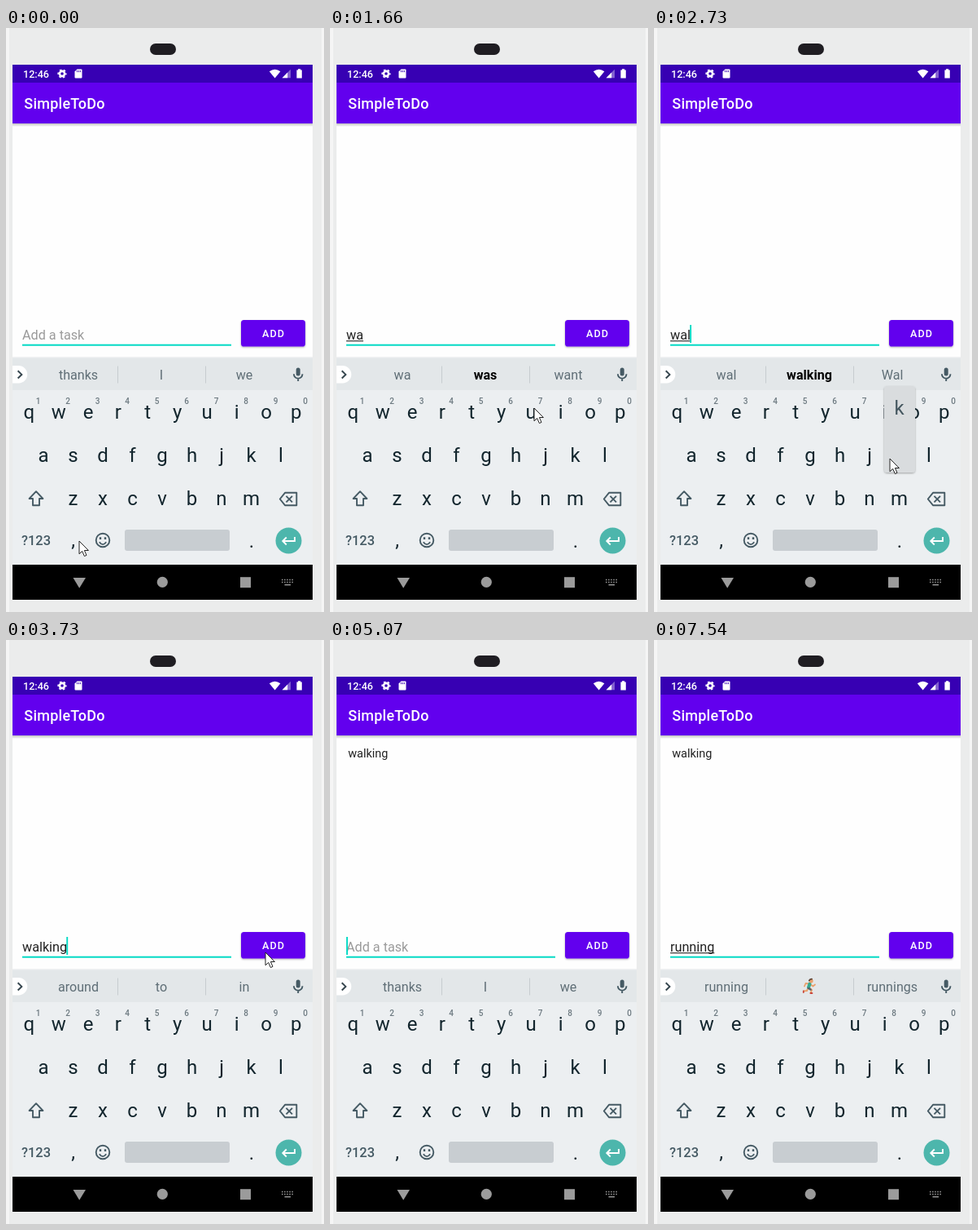
Write an HTML page that moves like this. It is 391 px wide and 716 px high and loops after 8000 ms.

```html
<!DOCTYPE html>
<html lang="en">
<head>
<meta charset="utf-8">
<title>To-do app demo</title>
<style>
html, body { margin: 0; width: 100%; height: 100%; overflow: hidden; background: #f5f5f5; }
svg { display: block; width: 391px; height: 716px; }
text { font-family: Roboto, sans-serif; white-space: pre; }
.mid { text-anchor: middle; }
.key { font-size: 24px; fill: #12252d; text-anchor: middle; }
.num { font-size: 10px; font-weight: 500; fill: #6c7980; text-anchor: middle; }
.sug { font-size: 16.1px; fill: #5f6e76; text-anchor: middle; }
.sug.bold { font-weight: 700; fill: #000; }
.line { fill: none; stroke: #455a64; stroke-width: 1.9; }
</style>
</head>
<body>
<svg viewBox="0 0 391 716">
  <defs>
    <linearGradient id="fade" x2="0" y2="1">
      <stop offset="0" stop-color="#000" stop-opacity=".24"/>
      <stop offset="1" stop-color="#000" stop-opacity="0"/>
    </linearGradient>
    <filter id="soft" x="-20%" y="-20%" width="140%" height="150%">
      <feDropShadow dx="0" dy="1" stdDeviation="1.1" flood-opacity=".32"/>
    </filter>
  </defs>

  <!-- phone body -->
  <rect width="391" height="716" fill="#f5f5f5"/>
  <rect x="4" width="384" height="716" fill="#ebecec"/>
  <rect x="177" y="19" width="32" height="14" rx="7" fill="#1f1d22"/>
  <rect x="8" y="45" width="369" height="656" fill="#fefefe"/>

  <!-- bars -->
  <rect x="8" y="45" width="369" height="22" fill="#3700b3"/>
  <rect x="8" y="67" width="369" height="50" fill="#6200ee"/>
  <rect x="8" y="117" width="369" height="4" fill="url(#fade)"/>
  <text x="21" y="60.7" font-size="12.6" font-weight="500" fill="#fff">12:46</text>
  <text x="22.3" y="98.6" font-size="18" font-weight="500" letter-spacing=".25" fill="#fff">SimpleToDo</text>

  <!-- status icons -->
  <g fill="#fff">
    <circle cx="69" cy="56" r="3.1" fill="none" stroke="#fff" stroke-width="2.6"/>
    <circle cx="69" cy="56" r="4.9" fill="none" stroke="#fff" stroke-width="1.5" stroke-dasharray="2.6 2.53" stroke-dashoffset="1.3"/>
    <path d="M87.500 50.500H92.500Q93.500 50.500 93.500 51.500V60.500Q93.500 61.500 92.500 61.500H85.500Q84.500 61.500 84.500 60.500V53.500Z"/>
    <path d="M87.400 52v2.200M89.400 52v2.200M91.400 52v2.200" stroke="#3700b3" stroke-width=".9"/>
    <path d="M323.800 53.300Q330.600 48.200 337.400 53.300L330.600 61.500Z"/>
    <path d="M350 50.800V61.200H339.600Z" opacity=".38"/>
    <path d="M346.200 54.600V61.200H339.600Z"/>
    <path d="M359 50.300h3.200v1.200h1.600v10h-6.400v-10h1.600Z"/>
  </g>

  <text id="item" x="22.300" y="143.700" font-size="14.4" fill="#222">walking</text>

  <!-- task field -->
  <text id="hint" x="20" y="381.800" font-size="16.2" fill="#9a9a9a">Add a task</text>
  <text id="task" x="20" y="381.800" font-size="16.2" fill="#212121"></text>
  <rect id="under" x="20" y="383.200" height="1.100" fill="#212121"/>
  <rect x="20" y="387.700" width="257" height="2" fill="#03dac5"/>
  <rect id="caret" y="364" width="1.900" height="22" fill="#03dac5"/>
  <rect id="button" x="289" y="358" width="79" height="32.500" rx="3.600" fill="#6200ee" filter="url(#soft)"/>
  <text class="mid" x="329.100" y="379.300" font-size="12.6" font-weight="500" letter-spacing="1.12" fill="#fff">ADD</text>

  <!-- keyboard -->
  <rect x="8" y="403" width="369" height="2" fill="#f1f2f3"/>
  <rect x="8" y="404.500" width="369" height="254" fill="#eceff1"/>
  <rect x="8" y="404.500" width="369" height="39.500" fill="#e3e7e9"/>
  <path d="M8 414H15.500A10.700 10.700 0 0 1 15.500 435.500H8Z" fill="#fff"/>
  <path d="M14.600 420.300L19.300 424.900L14.600 429.500" fill="none" stroke="#37474f" stroke-width="2"/>
  <path d="M137.500 414.500v21M245.500 414.500v21" stroke="#c6cccf"/>
  <g id="sugs"></g>
  <g id="runner" fill="none" stroke-linecap="round" stroke-linejoin="round">
    <path d="M190.500 426L194 429L192.500 433M189.500 426.500L188 430L184 430.500" stroke="#e9a06b" stroke-width="2"/>
    <path d="M192 422L195.500 424.500L198 422.500M190 421.500L186.500 421L185 424.500" stroke="#e9a06b" stroke-width="1.800"/>
    <path d="M191.500 421.500L190 426" stroke="#35a98f" stroke-width="4"/>
    <path d="M190 427L192.500 428.500" stroke="#53626b" stroke-width="2.600"/>
    <path d="M183.800 430.500v1.500M192.500 433h2" stroke="#c9463d" stroke-width="1.800"/>
    <circle cx="193.200" cy="418" r="2.500" fill="#e9a06b"/>
    <path d="M190.800 417.500Q191.500 415.500 194 415.600" stroke="#5b4032" stroke-width="1.800"/>
  </g>
  <g>
    <rect x="356.700" y="416.500" width="5" height="10" rx="2.500" fill="#455a64"/>
    <path class="line" d="M353.900 424.300A5.300 5.300 0 0 0 364.500 424.300M359.200 429.500V433" stroke-width="1.600"/>
  </g>
  <g id="keys"></g>
  <path class="line" d="M37 568.200L28.600 577H33V585.300H41V577H45.400Z" stroke-linejoin="round"/>
  <path class="line" d="M343 569.800H357.300V585.200H343L336.800 577.500Z" stroke-linejoin="round"/>
  <path class="line" d="M344.500 573.800L352 581.300M352 573.800L344.500 581.300"/>
  <text class="mid" x="37" y="634" font-size="16.4" font-weight="500" fill="#455a64">?123</text>
  <text class="key" x="82.500" y="636">,</text>
  <text class="key" x="302" y="637">.</text>
  <circle class="line" cx="119" cy="628" r="8.300"/>
  <path class="line" d="M114.800 630.200Q119 636 123.200 630.200" stroke-width="1.600"/>
  <path d="M116 624.300v2.800M122 624.300v2.800" stroke="#455a64" stroke-width="2.400"/>
  <rect x="146" y="615" width="129" height="26" rx="3" fill="#c8cdd1"/>
  <circle cx="347.500" cy="628.500" r="16" fill="#4db6ac"/>
  <path d="M355 624V629H340.500M344.800 624.500L340.300 629L344.800 633.500" fill="none" stroke="#fff" stroke-width="1.900"/>

  <!-- navigation -->
  <rect x="8" y="658" width="369" height="43" fill="#000"/>
  <g fill="#9b9b9b">
    <path d="M82.500 674H98L90.200 686.800Z"/>
    <circle cx="192.300" cy="679.300" r="6.600"/>
    <rect x="288" y="673.200" width="13" height="13"/>
    <path d="M339 676.500h14M339 679.500h14" stroke="#9b9b9b" stroke-width="1.400" stroke-dasharray="1.500 1.600"/>
    <path d="M342.500 682.700h7.500" stroke="#9b9b9b" stroke-width="1.400"/>
  </g>

  <g id="popup">
    <rect x="-18.500" y="-84" width="38" height="106" rx="4" fill="#d9dcde" filter="url(#soft)"/>
    <text class="key" y="-49.500" style="fill:#44565f"></text>
  </g>
  <path id="mouse" d="M0 0V15.800L3.700 12.400L6.400 18.600L9 17.400L6.400 11.500H11.400Z" fill="#fff" stroke="#222" stroke-width="1"/>
</svg>
<script>
const LOOP = 8000;
const $ = id => document.getElementById(id);
const set = (node, attrs) => {
  for (const name in attrs) node.setAttribute(name, attrs[name]);
  return node;
};
const show = (node, on) => { node.style.display = on ? '' : 'none'; };
const addText = (parent, text, attrs) => {
  const node = document.createElementNS('http://www.w3.org/2000/svg', 'text');
  node.textContent = text;
  return parent.appendChild(set(node, attrs));
};

const ticks = [
  0, 120, 270, 390, 520, 660, 790, 920, 1060,
  1210, 1340, 1490, 1660, 1790, 1940, 2080, 2210,
  2330, 2460, 2590, 2730, 2850, 2970, 3090, 3210, 3340,
  3460, 3590, 3730, 3880, 4010, 4150, 4290, 4430,
  4580, 4740, 4900, 5070, 5600, 5850, 6150, 6300, 6730, 7010, 7540
];

// time, field text, suggestions (* marks bold, @ the runner)
const edits = [
  [-600, '', 'thanks I we'],
  [660, 'w', 'w we what'],
  [1130, 'wa', 'wa *was want'],
  [2450, 'wal', 'wal *walking Wal'],
  [2850, 'walk', 'walk *walking walked'],
  [3460, 'walking', 'around to in'],
  [4010, '', 'thanks I we'],
  [5600, 'r', 'r *run running'],
  [5850, 'ru', 'ru *run runs'],
  [6150, 'run', 'run *running runs'],
  [6300, 'runn', 'runn *running runner'],
  [6730, 'runni', 'runni *running runnings'],
  [7010, 'running', 'running @ runnings']
];

const presses = [[520, 660, 'w'], [1210, 1340, 'a'], [2330, 2460, 'l'], [2730, 2850, 'k']];

// pointer: time, x, y
const path = [
  [0, 90, 629], [520, 66, 476], [660, 66, 476], [1060, 24, 522], [1210, 24, 522],
  [1660, 251, 466], [2210, 330, 524], [2460, 330, 524], [2730, 290, 528], [2850, 290, 528],
  [3340, 195, 421], [3460, 195, 421], [3730, 319, 383], [4010, 319, 383],
  [4430, 296, 406], [4740, 294, 404]
];

const keyAt = {};
[['qwertyuiop', 28.2, 478.5], ['asdfghjkl', 46, 531.5], ['zxcvbnm', 82.5, 584.5]].forEach(([row, x0, y]) => {
  [...row].forEach((c, i) => {
    const x = x0 + 36.5 * i;
    keyAt[c] = [x, y - 8.5];
    addText($('keys'), c, { x, y, class: 'key' });
  });
});
[...'1234567890'].forEach((c, i) => addText($('keys'), c, { x: 39.5 + 36.5 * i, y: 460.7, class: 'num' }));
const sugs = [89, 191, 293].map(x => addText($('sugs'), '', { x, y: 430.6, class: 'sug' }));

const last = (list, test) => list.filter(test).pop();

function pointer(t) {
  const i = path.findIndex(p => p[0] > t);
  if (i < 0) return null;
  const [t0, x0, y0] = path[i - 1], [t1, x1, y1] = path[i];
  const u = (t - t0) / (t1 - t0), k = u * u * (3 - 2 * u);
  return [x0 + (x1 - x0) * k, y0 + (y1 - y0) * k];
}

function draw(time) {
  const t = last(ticks, v => v <= time + 0.01);
  const [since, text, words] = last(edits, e => e[0] <= t);

  $('task').textContent = text;
  const width = text ? $('task').getComputedTextLength() : 0;
  const composing = text && since !== 3460;
  set($('under'), { width: composing ? width : 0 });
  set($('caret'), { x: 20 + Math.max(0, width - 0.8) });
  show($('caret'), Math.floor((t - since) / 500) % 2 === 0);
  show($('hint'), !text);
  show($('item'), t >= 4010);
  set($('button'), { fill: t >= 3880 && t < 4150 ? '#7a2bf2' : '#6200ee' });

  words.split(' ').forEach((word, i) => {
    sugs[i].textContent = word.replace(/[*@]/, '');
    set(sugs[i], { class: word[0] === '*' ? 'sug bold' : 'sug' });
  });
  show($('runner'), words.includes('@'));

  const press = presses.find(([from, to]) => t >= from && t < to);
  show($('popup'), press);
  if (press) {
    set($('popup'), { transform: `translate(${keyAt[press[2]]})` });
    $('popup').lastElementChild.textContent = press[2];
  }

  const pos = pointer(t);
  show($('mouse'), pos);
  if (pos) set($('mouse'), { transform: `translate(${pos})` });
}

function frame() {
  draw(performance.now() % LOOP);
  requestAnimationFrame(frame);
}
frame();
</script>
</body>
</html>
```
